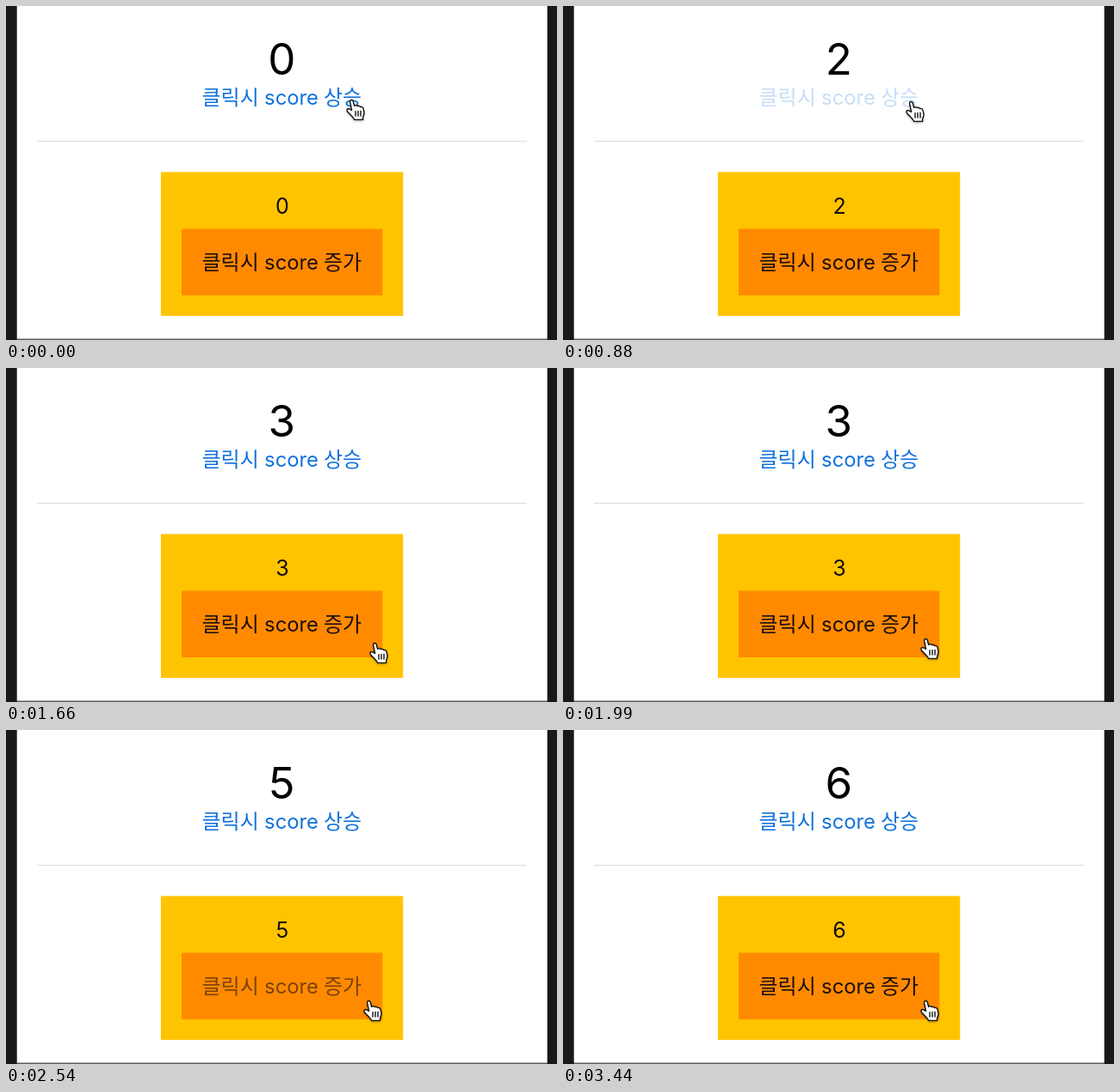
Animation of 640x389 px, one loop 3560 ms. Source, as an HTML page with a canvas:

```html
<!DOCTYPE html>
<html lang="ko">
<head>
<meta charset="utf-8">
<title>Score</title>
<style>
  html, body { margin: 0; width: 100%; height: 100%; overflow: hidden; background: #fff; }
  canvas { display: block; width: 640px; height: 389px; }
</style>
</head>
<body>
<canvas id="stage" width="640" height="389"></canvas>
<script>
const ctx = document.getElementById('stage').getContext('2d');
const LOOP = 3560, STEPS = 32, FADE = 3;
const LATIN = 'Inter, "Liberation Sans", sans-serif';
const HANGUL = '"Noto Sans CJK KR", "Noto Sans CJK", sans-serif';

// Steps at which a click is released, for each control
const linkClicks = [6, 8, 12];
const buttonClicks = [20, 23, 28];

const hand = new Path2D('M5.6 3.6C5.2 1.4 8.4.6 9.2 2.8L10.6 8.2C11.6 7.2 13.6 7.4 14.2 8.6C15.4 7.9 17 8.3 17.6 9.6C19 9 20.6 9.8 21 11.4L22 16C22.3 18 21.2 20 20.6 21.4V24.4H10.6C9.8 21.6 6 18.6 3 15.4C.6 13 2.6 10.6 5 11.8L7.6 13.4Z');
const creases = new Path2D('M12 14.6V20M15 14.4V20M18 14.2V20');

function ease(from, to, step) {
  const p = Math.min(1, Math.max(0, (step - from) / (to - from)));
  return p * p * (3 - 2 * p);
}

// Dims while pressed, then recovers after each release
function opacity(clicks, dim, step) {
  const fades = clicks.map(c => step < c - 1 ? 1 : dim + (1 - dim) * ease(c, c + FADE, step));
  return Math.min(...fades);
}

function rect(color, x, y, w, h) {
  ctx.fillStyle = color;
  ctx.fillRect(x, y, w, h);
}

function text(str, x, y, size, family, align = 'center') {
  ctx.font = `${size}px ${family}`;
  ctx.textAlign = align;
  ctx.fillText(str, x, y);
}

function label(ending, y, color, alpha) {
  ctx.globalAlpha = alpha;
  ctx.fillStyle = color;
  text('클릭시', 227.5, y - .4, 24, HANGUL, 'left');
  text('score', 331.5, y, 23.8, LATIN);
  text(ending, 369, y - .4, 24, HANGUL, 'left');
  ctx.globalAlpha = 1;
}

function drawHand(step) {
  const settle = ease(0, 3, step), travel = ease(12, 15, step), nudge = ease(16, 18, step);
  ctx.save();
  ctx.translate(394 + 3 * settle + 24 * travel - 7 * nudge,
                108 + 2 * settle + 209 * travel - 5 * nudge);
  ctx.lineJoin = ctx.lineCap = 'round';
  ctx.shadowColor = 'rgba(0,0,0,.4)';
  ctx.shadowBlur = 3;
  ctx.shadowOffsetY = 1.5;
  ctx.fillStyle = '#fff';
  ctx.fill(hand);
  ctx.shadowColor = 'transparent';
  ctx.strokeStyle = '#111';
  ctx.lineWidth = 1.4;
  ctx.stroke(hand);
  ctx.stroke(creases);
  ctx.restore();
}

function draw(step) {
  const score = [...linkClicks, ...buttonClicks].filter(c => c <= step).length;

  rect('#fff', 0, 0, 640, 389);
  rect('#dcdcdc', 36, 157, 569, 1);
  rect('#ffc400', 179.9, 193.4, 281.3, 167.5);
  rect('#ff8a00', 204, 259.5, 233.3, 77.5);
  rect('#5c5c5c', 0, 387.5, 640, 1.5);
  rect('#1a1816', 0, 0, 12.7, 389);
  rect('#1a1816', 628.7, 0, 11.3, 389);

  ctx.fillStyle = '#000';
  text(score, 320.3, 80, 51, LATIN);
  ctx.fillStyle = '#130e10';
  text(score, 321, 241.6, 25, LATIN);

  label('상승', 115.2, '#0f72dc', opacity(linkClicks, .23, step));
  label('증가', 307, '#1c0d14', opacity(buttonClicks, .58, step));
  drawHand(step);
}

const start = performance.now();
function tick() {
  const t = (performance.now() - start) % LOOP;
  draw(Math.min(STEPS - 1, Math.floor((t + 24) * STEPS / LOOP)));
  requestAnimationFrame(tick);
}
tick();
</script>
</body>
</html>
```
